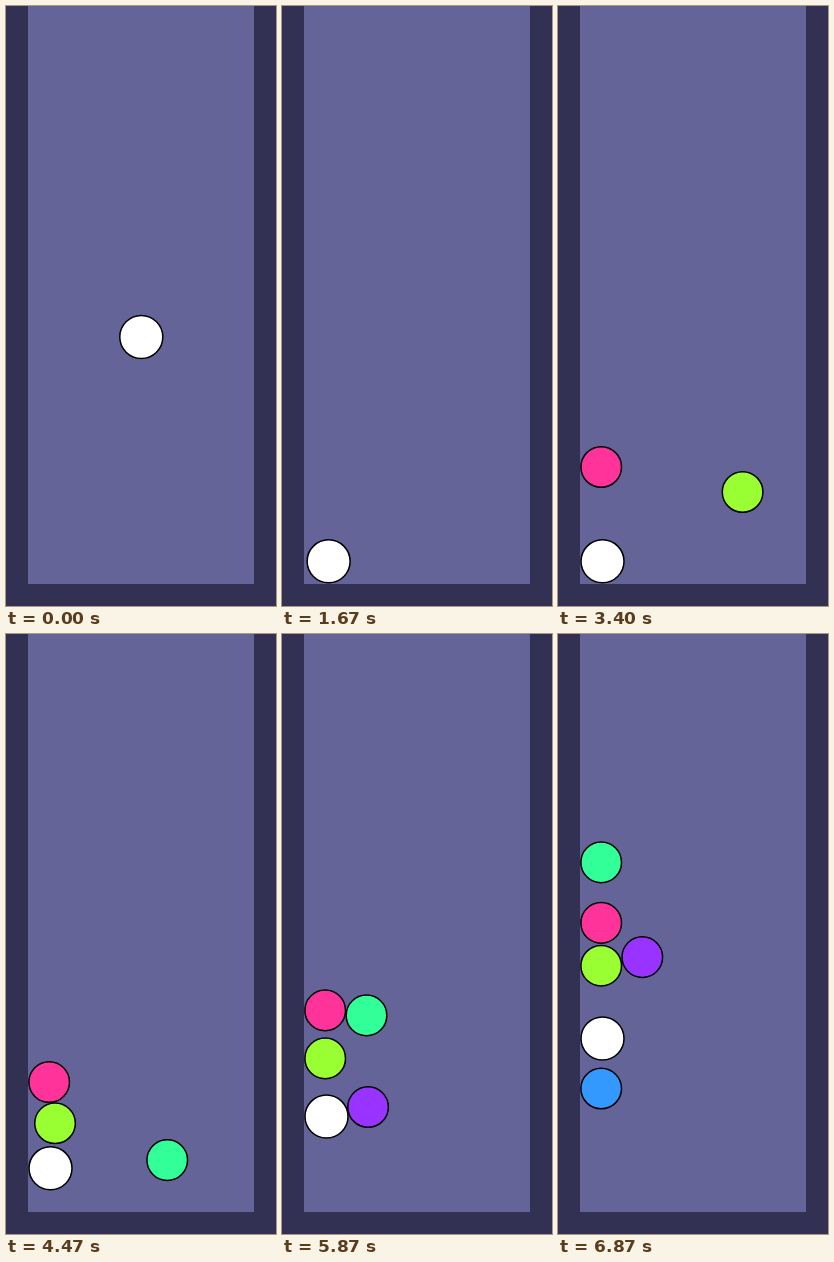
An HTML page that plays this animation: 270x600 px, repeating every 6940 ms.

```html
<!DOCTYPE html>
<html lang="en">
<head>
<meta charset="utf-8">
<title>Bouncing balls</title>
<style>
  html, body { margin: 0; width: 100%; height: 100%; overflow: hidden; background: #323053; }
  svg { display: block; width: 270px; height: 600px; }
</style>
</head>
<body>
<svg id="stage" viewBox="0 0 270 600">
  <rect width="270" height="600" fill="#323053"/>
  <rect x="22" width="226" height="578" fill="#646498"/>
</svg>
<script>
// Times are in seconds, lengths in pixels.
const LOOP = 6.94;
const FRAME_RATE = 15;
const WALL = 43.2;

// Monotone cubic through a few [time, value] points, starting at rest.
function curve(...points) {
  const last = points.length - 1;
  const slope = i => (points[i + 1][1] - points[i][1]) / (points[i + 1][0] - points[i][0]);
  const tangent = i => {
    if (i === 0) return 0;
    if (i === last) return slope(i - 1);
    const a = slope(i - 1), b = slope(i);
    return a * b <= 0 ? 0 : 2 * a * b / (a + b);
  };
  return t => {
    if (t <= points[0][0]) return points[0][1];
    if (t >= points[last][0]) return points[last][1];
    const i = points.findIndex(p => p[0] > t) - 1;
    const [t0, v0] = points[i], [t1, v1] = points[i + 1];
    const d = t1 - t0, u = (t - t0) / d, w = 1 - u;
    return v0 * w * w * (1 + 2 * u) + v1 * u * u * (3 - 2 * u)
      + d * u * w * (tangent(i) * w - tangent(i + 1) * u);
  };
}

// Distance from a surface: a fall from rest, then ever smaller bounces.
function bounce(t, drop, landing, flight, height, damping) {
  if (t < landing) return drop * (1 - (t / landing) ** 2);
  let since = t - landing;
  while (since > flight && height > 0.3) {
    since -= flight;
    flight *= damping;
    height *= damping ** 2;
  }
  const u = Math.min(since / flight, 1);
  return 4 * height * u * (1 - u);
}

// Pulled to the left from x0 until it meets the wall or a neighbour.
const pulled = (born, x0, pull, rest = () => WALL) =>
  t => Math.max(rest(t), x0 - pull * (t - born) ** 2 / 2);

const lift = curve([3.6, 555.3], [4.47, 534.2], [5.87, 482.4], [6.87, 404.2]);

const balls = [
  {
    color: "#ffffff", radius: 21.5, born: 0,
    x: t => 44.5 + bounce(t, 90.8, 0.637, 0.848, 69, 0.25),
    y: t => lift(t) - bounce(t, 224.3, 0.6, 0.27, 17, 0.45)
  },
  {
    color: "#ff3399", born: 2.133,
    x: pulled(2.133, 132, 440),
    y: curve([2.133, 397], [2.53, 419.5], [3.4, 461], [4.47, 448], [5.87, 376.2], [6.87, 288.6])
  },
  {
    color: "#99ff33", born: 3.2,
    x: pulled(3.2, 199, 720, curve([3.78, 75], [4.47, 49], [5, WALL])),
    y: curve([3.4, 486], [4.47, 489.3], [5.87, 424.2], [6.87, 331.4])
  },
  {
    color: "#33ff99", born: 4.133,
    x: pulled(4.133, 195.5, 615, curve([5.87, 84.5], [6.47, WALL])),
    y: curve([4.133, 533], [4.47, 526], [5.87, 381], [6.87, 227.9])
  },
  {
    color: "#9933ff", born: 5.2,
    x: pulled(5.2, 221.5, 615, curve([5.87, 86.1], [6.87, 84.3])),
    y: curve([5.2, 545], [5.87, 472.6], [6.87, 322.6])
  },
  {
    color: "#3399ff", born: 6,
    x: pulled(6, 149, 505),
    y: curve([6, 538], [6.87, 454.2])
  }
];

const stage = document.getElementById("stage");
for (const ball of balls) {
  ball.node = document.createElementNS("http://www.w3.org/2000/svg", "circle");
  const look = { r: ball.radius || 20.3, fill: ball.color, stroke: "#000", "stroke-width": 1.5 };
  for (const name in look) ball.node.setAttribute(name, look[name]);
  stage.append(ball.node);
}

function draw(time) {
  const t = Math.floor((time % LOOP + 0.004) * FRAME_RATE) / FRAME_RATE % LOOP;
  for (const { node, born, x, y } of balls) {
    node.style.display = t < born - 0.001 ? "none" : "";
    node.setAttribute("cx", x(t).toFixed(2));
    node.setAttribute("cy", y(t).toFixed(2));
  }
}

const start = performance.now();
function tick() {
  draw((performance.now() - start) / 1000);
  requestAnimationFrame(tick);
}
tick();
</script>
</body>
</html>
```
